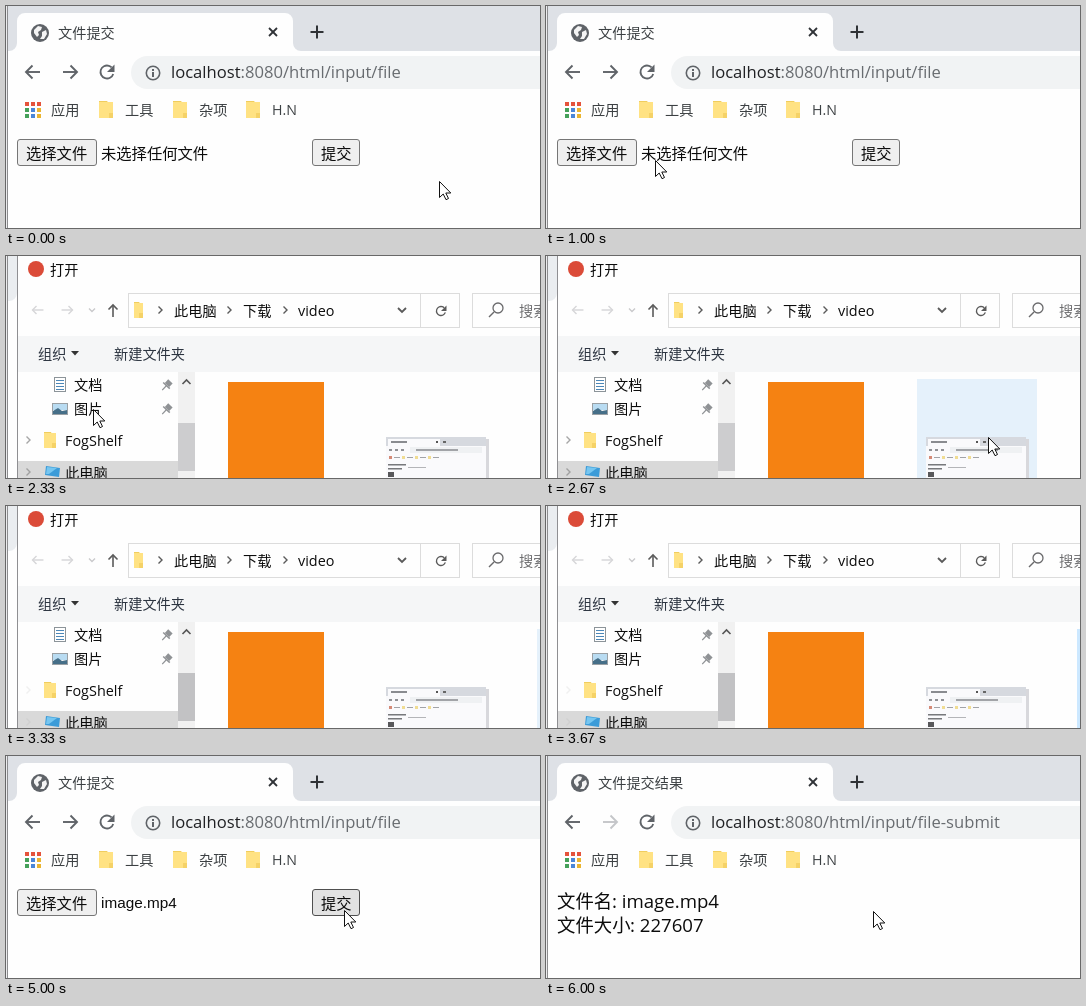
An HTML page with a canvas for the animation above (6.33 s loop, 534 by 222 pixels).

```html
<!DOCTYPE html>
<html lang="zh-CN">
<head>
<meta charset="utf-8">
<title>文件提交</title>
<style>
html, body { margin: 0; width: 100%; height: 100%; overflow: hidden; background: #fefefe; }
canvas { display: block; width: 534px; height: 222px; }
</style>
</head>
<body>
<canvas id="stage"></canvas>
<script>
const W = 534, H = 222, LOOP = 6330;
const canvas = document.getElementById('stage');
const ctx = canvas.getContext('2d');
const dpr = window.devicePixelRatio || 1;
canvas.width = W * dpr;
canvas.height = H * dpr;

const UI = '"Open Sans", "Noto Sans CJK SC", "Noto Sans CJK", sans-serif';
const FORM = '"Liberation Sans", "Noto Sans CJK SC", "Noto Sans CJK", sans-serif';
const PAGE = '#fefefe', INK = '#0c0c0c', LABEL = '#3c4043', GREY = '#5f6368', PALE = '#c4c6c9';
const HOVER = '#e5f1fb', PICKED = '#cce8ff';

// Each step holds until the next one starts; tile is [left edge, color].
const steps = [
  { at: 0, cursor: [433, 175] },
  { at: 670, cursor: [255, 173] },
  { at: 1000, cursor: [109, 154] },
  { at: 1330, cursor: [88, 154], choose: true },
  { at: 1670, cursor: [87, 153], choose: true },
  { at: 2000, cursor: [87, 153], choose: true, inactive: true },
  { at: 2330, cursor: [87, 153], dialog: true },
  { at: 2670, cursor: [442, 181], dialog: true, tile: [371, HOVER] },
  { at: 3000, cursor: [515, 190], dialog: true },
  { at: 3330, dialog: true, dim: true, tile: [531, HOVER] },
  { at: 3670, dialog: true, dim: true, tile: [531, PICKED] },
  { at: 4000, cursor: [444, 208], file: true },
  { at: 4330, cursor: [457, 194], file: true },
  { at: 4670, cursor: [388, 164], file: true },
  { at: 5000, cursor: [338, 154], file: true, submit: true },
  { at: 5330, cursor: [334, 165], result: true },
  { at: 5670, cursor: [329, 159], result: true },
  { at: 6000, cursor: [327, 155], result: true }
];

function rect(x, y, w, h, color) {
  ctx.fillStyle = color;
  ctx.fillRect(x, y, w, h);
}

function frame(x, y, w, h, color) {
  ctx.strokeStyle = color;
  ctx.lineWidth = 1;
  ctx.strokeRect(x + .5, y + .5, w - 1, h - 1);
}

function disc(x, y, r, color) {
  ctx.fillStyle = color;
  ctx.beginPath();
  ctx.arc(x, y, r, 0, 7);
  ctx.fill();
}

function ring(x, y, r, color, width) {
  ctx.strokeStyle = color;
  ctx.lineWidth = width;
  ctx.beginPath();
  ctx.arc(x, y, r, 0, 7);
  ctx.stroke();
}

function text(str, x, y, size, color = INK, family = UI) {
  ctx.font = size + 'px ' + family;
  ctx.fillStyle = color;
  ctx.fillText(str, x, y);
}

// Points are flat x, y pairs relative to (x, y).
function trace(x, y, pts) {
  ctx.beginPath();
  for (let i = 0; i < pts.length; i += 2) ctx.lineTo(x + pts[i], y + pts[i + 1]);
}

function line(x, y, pts, color, width = 1.5) {
  trace(x, y, pts);
  ctx.strokeStyle = color;
  ctx.lineWidth = width;
  ctx.stroke();
}

function poly(x, y, pts, color) {
  trace(x, y, pts);
  ctx.fillStyle = color;
  ctx.fill();
}

function arrow(x, y, size, head, angle, color, width) {
  ctx.save();
  ctx.translate(x, y);
  ctx.rotate(angle);
  line(0, 0, [-size, 0, size, 0], color, width);
  line(0, 0, [size - head, -head, size, 0, size - head, head], color, width);
  ctx.restore();
}

function reload(x, y, r, color, width) {
  ctx.strokeStyle = color;
  ctx.lineWidth = width;
  ctx.beginPath();
  ctx.arc(x, y, r, .3, 5.5);
  ctx.stroke();
  poly(x, y, [r + 1, -r - 1, r + 1, 0, 0, 0], color);
}

function folder(x, y, w, h) {
  rect(x, y, w * .6, 4, '#f0cd5e');
  rect(x, y + 1, w, h - 1, '#ffe283');
  rect(x + w - 4, y + h - 5, 4, 5, '#f5d267');
}

function globe(x, y) {
  disc(x, y, 9, '#5f6368');
  poly(x, y, [-6, -3, -2, -7, 2, -6, 1, -3, -2, -1, -1, 2, -3, 4, -6, 0], '#f4f4f4');
  poly(x, y, [2, -1, 6, -3, 7, 1, 4, 6, 0, 6, 2, 3], '#f4f4f4');
}

function button(label, x, w, hover) {
  ctx.beginPath();
  ctx.roundRect(x + .5, 133.5, w - 1, 26, 2.5);
  ctx.fillStyle = hover ? '#e2e2e2' : '#efefef';
  ctx.fill();
  ctx.strokeStyle = hover ? '#4f4f4f' : '#767676';
  ctx.lineWidth = 1;
  ctx.stroke();
  text(label, x + 9, 153, 15.3, INK, FORM);
}

function drawTabs(s) {
  const tone = s.inactive ? '#6d7074' : '#2f3236';
  rect(0, 0, W, 45, s.inactive ? '#eaedf0' : '#dee1e6');
  ctx.fillStyle = PAGE;
  ctx.beginPath();
  ctx.moveTo(3, 45);
  ctx.arcTo(11, 45, 11, 37, 8);
  ctx.arcTo(11, 7, 19, 7, 8);
  ctx.arcTo(287, 7, 287, 15, 8);
  ctx.arcTo(287, 45, 295, 45, 8);
  ctx.lineTo(295, 45);
  ctx.fill();
  globe(34, 27);
  text(s.result ? '文件提交结果' : '文件提交', 52, 32, 14.2, s.inactive ? '#606468' : LABEL);
  line(267, 26, [-4, -4, 4, 4], tone, 1.8);
  line(267, 26, [4, -4, -4, 4], tone, 1.8);
  line(311, 26, [-6.5, 0, 6.5, 0], tone, 2);
  line(311, 26, [0, -6.5, 0, 6.5], tone, 2);
}

function drawToolbar(s) {
  arrow(27, 66, 7, 6.5, Math.PI, GREY, 1.9);
  arrow(64, 66, 7, 6.5, 0, s.result ? PALE : GREY, 1.9);
  reload(101, 66, 6.5, GREY, 1.8);
  ctx.fillStyle = '#f1f3f4';
  ctx.beginPath();
  ctx.roundRect(125, 50, 440, 33, 16.5);
  ctx.fill();
  ring(147, 67, 6.7, GREY, 1.6);
  rect(146, 63, 2, 2, GREY);
  rect(146, 66, 2, 5, GREY);
  const host = 'localhost';
  text(host, 165, 72, 16.6, '#202124');
  const x = 165 + ctx.measureText(host).width;
  text(':8080/html/input/file' + (s.result ? '-submit' : ''), x, 72, 16.6, '#686c70');
}

function drawBookmarks() {
  const [red, yellow, green, blue] = ['#e5533c', '#eab530', '#45a15a', '#4a86d8'];
  [red, red, red, green, blue, yellow, green, blue, yellow].forEach((c, i) =>
    rect(19 + i % 3 * 6, 96 + Math.floor(i / 3) * 6, 4, 4, c));
  text('应用', 45, 109, 14.2, LABEL);
  [[93, '工具'], [167, '杂项'], [240, 'H.N']].forEach(([x, name]) => {
    folder(x, 95, 14, 17);
    text(name, x + 26, 109, 14.2, LABEL);
  });
}

function drawBrowser(s) {
  rect(0, 0, W, H, PAGE);
  drawTabs(s);
  drawToolbar(s);
  drawBookmarks();
  if (s.result) {
    text('文件名', 11, 152, 18.4);
    text(': image.mp4', 66, 152, 18.6);
    text('文件大小', 11, 176, 18.4);
    text(': 227607', 84, 176, 18.6);
  } else {
    button('选择文件', 11, 80, s.choose);
    text(s.file ? 'image.mp4' : '未选择任何文件', 95, s.file ? 152 : 153, 15.3, INK, FORM);
    button('提交', 306, 48, s.submit);
  }
  rect(0, 0, 1, H, '#ececee');
  rect(1, 0, 1, H, '#8c8c8e');
}

function chevron(x, y, color = '#5a5a5a') {
  line(x, y, [-1.5, -3.5, 2, 0, -1.5, 3.5], color, 1.4);
}

function pin(x, y) {
  ctx.save();
  ctx.translate(x, y);
  ctx.rotate(.75);
  rect(-3, -5, 6, 5, '#8f9295');
  rect(-4.5, 0, 9, 1.5, '#8f9295');
  rect(-.6, 1, 1.2, 6, '#8f9295');
  ctx.restore();
}

function drawThumb() {
  rect(381, 183, 102, 39, '#d8d8dc');
  rect(380, 181, 100, 41, '#fafafc');
  rect(380, 181, 100, 9, '#d6d9df');
  rect(382, 183, 52, 7, '#fafafc');
  rect(385, 185, 16, 2, '#8a8c90');
  rect(430, 185, 2, 2, '#555');
  rect(437, 185, 3, 2, '#666');
  for (let i = 0; i < 3; i++) rect(383 + i * 6, 193, 3, 2, '#909296');
  rect(404, 191, 72, 6, '#eff1f3');
  rect(410, 193, 42, 2, '#a2a4a8');
  for (let i = 0; i < 4; i++) {
    rect(383 + i * 13, 200, 3, 3, i ? '#f0dd94' : '#d58b78');
    rect(388 + i * 13, 201, 6, 1, '#a2a4a8');
  }
  rect(382, 208, 18, 1.5, '#77797c');
  rect(382, 212, 14, 1.5, '#77797c');
  rect(402, 211, 18, 1, '#b4b5b8');
  rect(382, 216, 6, 5, '#58585a');
}

function drawSidebar(s) {
  frame(48, 121, 12, 15, '#8c9499');
  for (let i = 0; i < 4; i++) rect(50, 124 + i * 3, 8, 1, '#4b87b8');
  text('文档', 68, 134, 14.2);
  frame(46, 147, 16, 12, '#9aa0a4');
  rect(47, 148, 14, 6, '#b9dcf2');
  poly(47, 158, [0, 0, 0, -3, 5, -6, 9, -3, 14, -4, 14, 0], '#466f88');
  text('图片', 68, 158, 14.2);
  pin(161, 129);
  pin(161, 153);

  rect(12, 205, 160, 17, '#d9d9d9');
  chevron(22, 184, s.dim ? '#f0f0f0' : '#a6a6a6');
  chevron(22, 216, s.dim ? '#d0d0d0' : '#a0a0a0');
  folder(38, 176, 12, 16);
  text('FogShelf', 59, 190, 14.4);
  poly(39, 210, [1, 0, 15, 2, 14, 11, 0, 9], '#3b9bd8');
  poly(41, 211, [0, 0, 10, 1, 2, 7, -1, 7], '#76c6f0');
  text('此电脑', 59, 222, 14.2);

  rect(172, 116, 17, 106, '#f1f1f1');
  line(180.5, 126, [-4, 2, 0, -2, 4, 2], '#555', 1.6);
  rect(172, 167, 17, 48, s.dim ? '#c2c2c4' : '#cdcdcf');
}

function drawDialog(s) {
  drawBrowser({ inactive: true });
  rect(11, 0, W, H, PAGE);
  rect(11, 0, 1, H, '#8f8f92');
  disc(30, 13, 8, '#db4b38');
  text('打开', 44, 19, 14.2);

  arrow(32, 54, 5.5, 4, Math.PI, '#d6d6d8', 1.4);
  arrow(61, 54, 5.5, 4, 0, '#d6d6d8', 1.4);
  line(86, 54, [-3, -1.5, 0, 1.5, 3, -1.5], '#cacacc', 1.4);
  arrow(107, 55, 6, 4.5, -Math.PI / 2, '#5a5a5a', 1.6);
  frame(122, 37, 332, 35, '#dcdcdc');
  rect(414, 38, 1, 33, '#dcdcdc');
  folder(128, 46, 9, 16);
  [154, 223, 279].forEach(x => chevron(x, 54));
  text('此电脑', 168, 60, 14.2);
  text('下载', 237, 60, 14.2);
  text('video', 292, 60, 14.4);
  line(396, 54, [-4, -2, 0, 2, 4, -2], '#5a5a5a', 1.8);
  reload(435, 55, 4.5, '#5a5a5a', 1.3);
  frame(466, 37, 80, 35, '#dcdcdc');
  ring(492, 52, 5, '#6a6a6c', 1.3);
  line(488, 56, [0, 0, -5, 5], '#6a6a6c', 1.5);
  text('搜索', 513, 60, 14.2, '#6e6e70');

  rect(12, 80, W, 36, '#f5f6f7');
  text('组织', 32, 103, 14.2, '#2c3440');
  poly(69, 97, [-4, -2, 4, -2, 0, 2.5], '#333');
  text('新建文件夹', 108, 103, 14.2, '#2c3440');

  drawSidebar(s);
  rect(222, 126, 96, 96, '#f58212');
  if (s.tile) rect(s.tile[0], 123, 120, 99, s.tile[1]);
  drawThumb();
}

function drawCursor([x, y]) {
  trace(x, y, [.5, .5, .5, 16.5, 4.2, 13, 7, 18.7, 9.5, 17.5, 6.8, 12, 11.8, 12]);
  ctx.closePath();
  ctx.fillStyle = '#fff';
  ctx.fill();
  ctx.strokeStyle = '#111';
  ctx.lineWidth = 1;
  ctx.stroke();
}

function draw(now) {
  const t = now % LOOP;
  const s = steps.findLast(step => step.at <= t) || steps[0];
  ctx.setTransform(dpr, 0, 0, dpr, 0, 0);
  if (s.dialog) drawDialog(s);
  else drawBrowser(s);
  if (s.cursor) drawCursor(s.cursor);
}

const start = performance.now();
function tick() {
  draw(performance.now() - start);
  requestAnimationFrame(tick);
}
tick();
</script>
</body>
</html>
```
